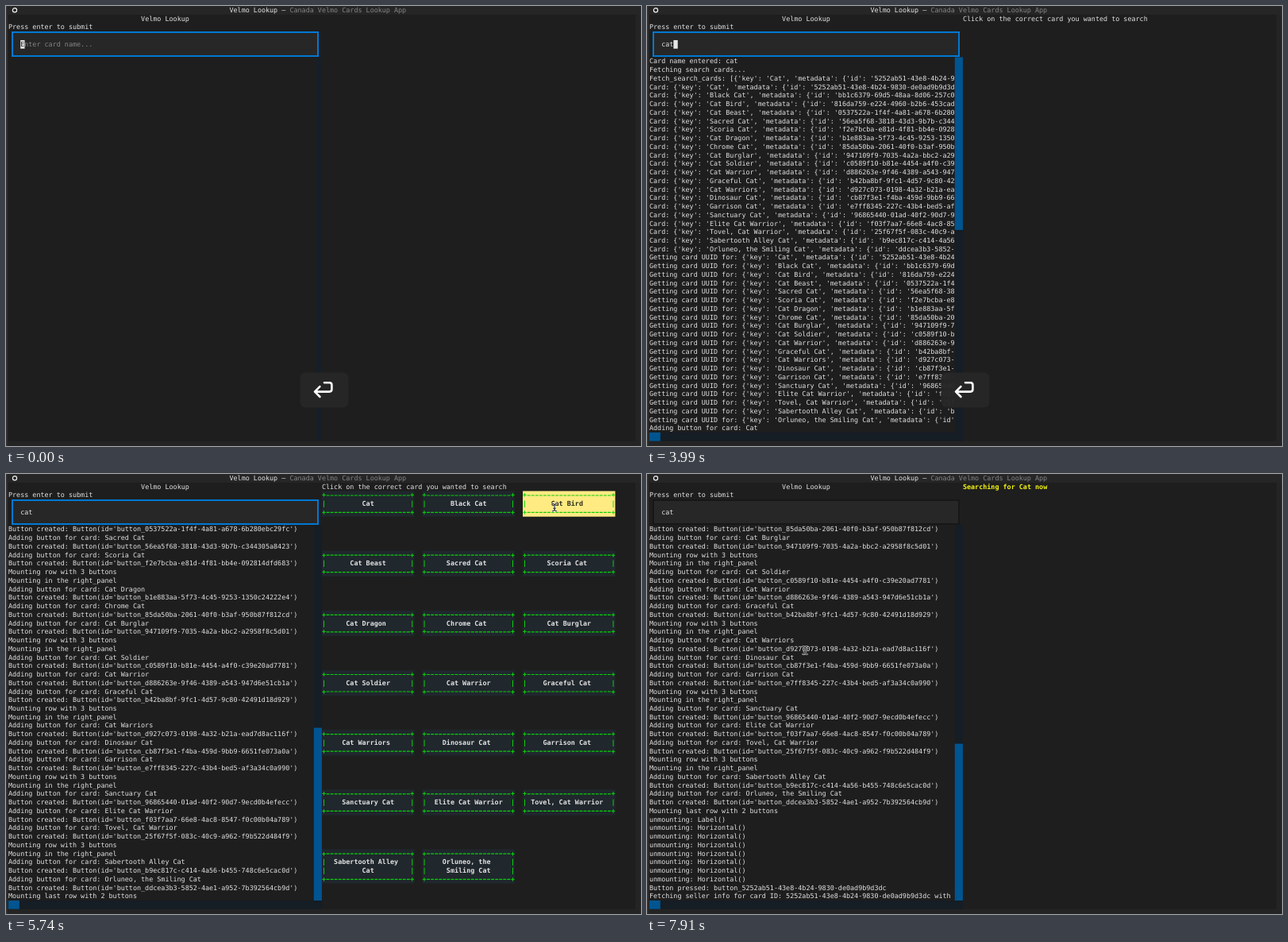
Animation of 800 by 554 pixels, one loop 8 s. Source, as an HTML page:

```html
<!DOCTYPE html>
<html lang="en">
<head>
<meta charset="utf-8">
<title>Card search</title>
<style>
  html, body { margin: 0; width: 100%; height: 100%; overflow: hidden; background: #242424; }
  svg { display: block; width: 800px; height: 554px; }
  text {
    font: 8.41px "DejaVu Sans Mono", "Noto Sans Mono", monospace;
    text-rendering: geometricPrecision;
    white-space: pre;
    fill: #e2e2e2;
  }
  .bold { font-weight: bold; }
  .dim { fill: #858585; }
  .frame text { fill: #0bd80b; font-weight: bold; }
  .frame line { stroke: #0bd00b; stroke-width: 1.2; stroke-dasharray: 3.9 1.163; }
  .button rect { fill: #20272d; }
  .button.hover rect { fill: #ffeb82; }
  .button.hover .label { fill: #2a2a1c; }
</style>
</head>
<body>
<svg id="stage" viewBox="0 0 800 554" xmlns="http://www.w3.org/2000/svg"></svg>
<script>
const LOOP = 8000;
const CELL_W = 5.063, CELL_H = 10.74, LEFT = 3, BASELINE = 8;
const LOG_TOP = 6, LOG_ROWS = 44, LOG_COLS = 76;
const RIGHT_COL = 78, BUTTON_COLS = 23;

const APP = "Velmo Lookup";
const SUBTITLE = "Canada Velmo Cards Lookup App";

const CARDS = [
  ["Cat", "5252ab51-43e8-4b24-9830-de0ad9b9d3dc"],
  ["Black Cat", "bb1c6379-69d5-48aa-8d06-257c0"],
  ["Cat Bird", "816da759-e224-4960-b2b6-453cad"],
  ["Cat Beast", "0537522a-1f4f-4a81-a678-6b280ebc29fc"],
  ["Sacred Cat", "56ea5f68-3818-43d3-9b7b-c344305a8423"],
  ["Scoria Cat", "f2e7bcba-e81d-4f81-bb4e-092814dfd683"],
  ["Cat Dragon", "b1e883aa-5f73-4c45-9253-1350c24222e4"],
  ["Chrome Cat", "85da50ba-2061-40f0-b3af-950b87f812cd"],
  ["Cat Burglar", "947109f9-7035-4a2a-bbc2-a2958f8c5d01"],
  ["Cat Soldier", "c0589f10-b81e-4454-a4f0-c39e20ad7781"],
  ["Cat Warrior", "d886263e-9f46-4389-a543-947d6e51cb1a"],
  ["Graceful Cat", "b42ba8bf-9fc1-4d57-9c80-42491d18d929"],
  ["Cat Warriors", "d927c073-0198-4a32-b21a-ead7d8ac116f"],
  ["Dinosaur Cat", "cb87f3e1-f4ba-459d-9bb9-6651fe073a0a"],
  ["Garrison Cat", "e7ff8345-227c-43b4-bed5-af3a34c0a990"],
  ["Sanctuary Cat", "96865440-01ad-40f2-90d7-9ecd0b4efecc"],
  ["Elite Cat Warrior", "f03f7aa7-66e8-4ac8-8547-f0c00b04a789"],
  ["Tovel, Cat Warrior", "25f67f5f-083c-40c9-a962-f9b522d484f9"],
  ["Sabertooth Alley Cat", "b9ec817c-c414-4a56-b455-748c6e5cac0d"],
  ["Orluneo, the Smiling Cat", "ddcea3b3-5852-4ae1-a952-7b392564cb9d"],
];

const stage = document.getElementById("stage");
const colX = c => LEFT + c * CELL_W;
const rowY = r => r * CELL_H;

function add(parent, tag, attrs = {}) {
  const node = document.createElementNS("http://www.w3.org/2000/svg", tag);
  for (const name in attrs) node.setAttribute(name, attrs[name]);
  parent.appendChild(node);
  return node;
}
const rect = (parent, x, y, width, height, fill) =>
  add(parent, "rect", { x, y, width, height, ...(fill && { fill }) });
function write(parent, col, row, content, cls = "") {
  const node = add(parent, "text", { x: colX(col), y: rowY(row) + BASELINE, class: cls });
  node.textContent = content;
  return node;
}
const show = (node, on) => node.setAttribute("visibility", on ? "visible" : "hidden");

// Log contents
function buildLog() {
  const record = ([name, id]) => `{'key': '${name}', 'metadata': {'id': '${id}'`;
  const lines = ["Card name entered: cat", "Fetching search cards...",
    "Fetch_search_cards: [" + record(CARDS[0])];
  CARDS.forEach(card => lines.push("Card: " + record(card)));
  CARDS.forEach(card => lines.push("Getting card UUID for: " + record(card)));
  CARDS.forEach(([name, id], i) => {
    lines.push("Adding button for card: " + name, `Button created: Button(id='button_${id}')`);
    if (i % 3 === 2) lines.push("Mounting row with 3 buttons", "Mounting in the right_panel");
  });
  lines.push("Mounting last row with 2 buttons");
  const pressed = ["unmounting: Label()", ...Array(7).fill("unmounting: Horizontal()"),
    "Button pressed: button_" + CARDS[0][1],
    `Fetching seller info for card ID: ${CARDS[0][1]} with`];
  return { listed: lines, all: lines.concat(pressed) };
}
const LOG = buildLog();

// Window
rect(stage, 0, 0, 800, 554, "#242424");
rect(stage, 0, 0, 1.6, 554, "#343434");
rect(stage, LEFT, rowY(1), 790, rowY(50), "#1e1e1e");
rect(stage, 1.6, 0, 799, rowY(1), "#262626");
add(stage, "circle", { cx: 11, cy: 5.2, r: 2.6, fill: "none", stroke: "#f0f0f0", "stroke-width": 1.2 });
write(stage, 55, 0, APP + " —");
write(stage, 70, 0, SUBTITLE, "dim");
write(stage, 33, 1, APP);
write(stage, 0, 2, "Press enter to submit");
rect(stage, 391, rowY(6), 7, rowY(45), "#161f28");

// Log panel
const logPanel = add(stage, "g");
rect(logPanel, 388, rowY(LOG_TOP), 10, rowY(LOG_ROWS), "#151d25");
rect(logPanel, LEFT, rowY(50), 395, CELL_H, "#151d25");
rect(logPanel, LEFT, rowY(50), 13.8, CELL_H, "#005591");
const thumb = rect(logPanel, colX(LOG_COLS), 0, 2 * CELL_W, 0, "#005591");
const logRows = Array.from({ length: LOG_ROWS }, (_, i) => write(logPanel, 0, LOG_TOP + i, ""));

// Input
const inputBox = add(stage, "rect", { x: 8, y: 33, width: 385, height: 30, fill: "#272727", "stroke-width": 2 });
const placeholder = write(stage, 3, 4, "Enter card name...", "dim");
const typed = write(stage, 3, 4, "");
const caret = rect(stage, 0, rowY(4), CELL_W + 0.3, CELL_H, "#e6e6e6");
const caretLetter = write(stage, 3, 4, "E");
caretLetter.style.fill = "#2a2a2a";

// Right panel
const prompt = write(stage, RIGHT_COL, 1, "Click on the correct card you wanted to search");
const searching = write(stage, RIGHT_COL, 1, "Searching for Cat now", "bold");
searching.style.fill = "#f6f614";

function wrap(name, width) {
  return name.split(" ").reduce((lines, word) => {
    const last = lines[lines.length - 1];
    if (last && (last + " " + word).length <= width) lines[lines.length - 1] = last + " " + word;
    else lines.push(word);
    return lines;
  }, []);
}
function drawEdge(frame, col, row) {
  const y = rowY(row) + 5.5, lastCol = col + BUTTON_COLS - 1;
  write(frame, col, row, "+");
  write(frame, lastCol, row, "+");
  add(frame, "line", { x1: colX(col + 1) + 0.6, x2: colX(lastCol), y1: y, y2: y });
}
const buttonLayer = add(stage, "g");
const buttons = CARDS.map(([name], i) => {
  const col = RIGHT_COL + 25 * (i % 3), row = 2 + 7 * Math.floor(i / 3);
  const lines = wrap(name, 18);
  const node = add(buttonLayer, "g", { class: "button" });
  const box = { x: colX(col), y: rowY(row), w: BUTTON_COLS * CELL_W, h: rowY(lines.length + 2) };
  rect(node, box.x, box.y, box.w, box.h);
  const frame = add(node, "g", { class: "frame" });
  drawEdge(frame, col, row);
  drawEdge(frame, col, row + lines.length + 1);
  lines.forEach((line, n) => {
    const y = row + 1 + n;
    write(frame, col, y, "|");
    write(frame, col + BUTTON_COLS - 1, y, "|");
    write(node, col + 1 + Math.floor((BUTTON_COLS - 2 - line.length) / 2), y, line, "label bold");
  });
  return { node, box };
});

// Key press badge
const badge = add(stage, "g");
add(badge, "rect", { x: 370.5, y: 461.5, width: 61, height: 44, rx: 7, fill: "#272727", opacity: 0.96 });
add(badge, "path", {
  d: "M401 474.2H407.5Q410.4 474.2 410.4 477V482.6Q410.4 485.6 407.5 485.6H389.4M395.4 479.2L389 485.6L395.4 492",
  fill: "none", stroke: "#fff", "stroke-width": 2.6, "stroke-linecap": "round", "stroke-linejoin": "round",
});

// I-beam pointer
const pointer = add(stage, "g");
for (const [stroke, width] of [["#f4f4f4", 2.1], ["#1c1c1c", 1]]) {
  add(pointer, "path", {
    d: "M-2.6 -4.8Q0 -4.8 0 -2.8Q0 -4.8 2.6 -4.8M0 -2.8V2.8M-2.6 4.8Q0 4.8 0 2.8Q0 4.8 2.6 4.8M-1.3 1.2H1.3",
    fill: "none", stroke, "stroke-width": width, "stroke-linecap": "round",
  });
}

// Timeline
const TIME = {
  keys: [3080, 3220, 3430], enter: 3780, fetched: 3920, scrolled: 4060,
  mounted: 4130, badgeOff: 5350, click: 7280, cleared: 7420,
};
const POINTER = [
  [910, 530, 545], [1680, 122, 58], [1750, 120, 55], [4480, 120, 55], [4830, 472, 38],
  [5040, 479, 33], [5740, 691, 42], [5810, 694, 43], [6160, 694, 43], [6720, 463, 58],
  [6930, 458, 42], [7280, 458, 40], [7910, 199, 222],
];
const BLINKS = [1030, 1540, 2030, 2590, 4725, 5225, 5725, 6225, 6725, 7225];

function pointerAt(t) {
  const next = POINTER.findIndex(p => p[0] > t);
  if (next < 0) return POINTER[POINTER.length - 1].slice(1);
  const [t0, x0, y0] = POINTER[Math.max(0, next - 1)], [t1, x1, y1] = POINTER[next];
  const k = t1 > t0 ? Math.max(0, (t - t0) / (t1 - t0)) : 0;
  return [x0 + (x1 - x0) * k, y0 + (y1 - y0) * k];
}

// The scroll thumb moves in eighths of a row.
function drawThumb(total, top) {
  const unit = CELL_H / 8, track = LOG_ROWS * 8;
  const size = Math.ceil(track * LOG_ROWS / total);
  thumb.setAttribute("y", rowY(LOG_TOP) + Math.floor(track * top / total) * unit);
  thumb.setAttribute("height", total > LOG_ROWS ? size * unit : 0);
}

let logState = "";
function drawLog(t) {
  const lines = t < TIME.enter + 70 ? [] : t < TIME.fetched ? LOG.listed.slice(0, 2)
    : t < TIME.cleared ? LOG.listed : LOG.all;
  const top = t < TIME.scrolled ? 0 : Math.max(0, lines.length - LOG_ROWS);
  const state = lines.length + ":" + top;
  if (state === logState) return;
  logState = state;
  show(logPanel, lines.length > 0);
  logRows.forEach((node, i) => { node.textContent = (lines[top + i] || "").slice(0, LOG_COLS); });
  drawThumb(Math.max(lines.length, 1), top);
}

function drawInput(t) {
  const count = TIME.keys.filter(k => t >= k).length;
  const focused = t < TIME.click;
  const lit = focused && BLINKS.filter(b => t >= b).length % 2 === 0;
  inputBox.setAttribute("stroke", focused ? "#0178d4" : "#171717");
  typed.textContent = "cat".slice(0, count);
  show(placeholder, count === 0);
  caret.setAttribute("x", colX(3 + count));
  show(caret, lit);
  show(caretLetter, lit && count === 0);
}

function draw(t) {
  drawLog(t);
  drawInput(t);
  const [x, y] = pointerAt(t);
  pointer.setAttribute("transform", `translate(${x} ${y})`);
  show(pointer, (t >= 910 && t < TIME.keys[0]) || t >= 4480);
  show(prompt, t >= TIME.fetched && t < TIME.cleared);
  show(searching, t >= TIME.cleared);
  show(buttonLayer, t >= TIME.mounted && t < TIME.cleared);
  for (const { node, box } of buttons) {
    const inside = x >= box.x && x < box.x + box.w && y >= box.y && y < box.y + box.h;
    node.classList.toggle("hover", t >= 4480 && inside);
  }
  show(badge, t < 350 || (t >= TIME.enter && t < TIME.badgeOff));
}

const start = performance.now();
function tick() {
  draw((performance.now() - start) % LOOP);
  requestAnimationFrame(tick);
}
tick();
</script>
</body>
</html>
```
